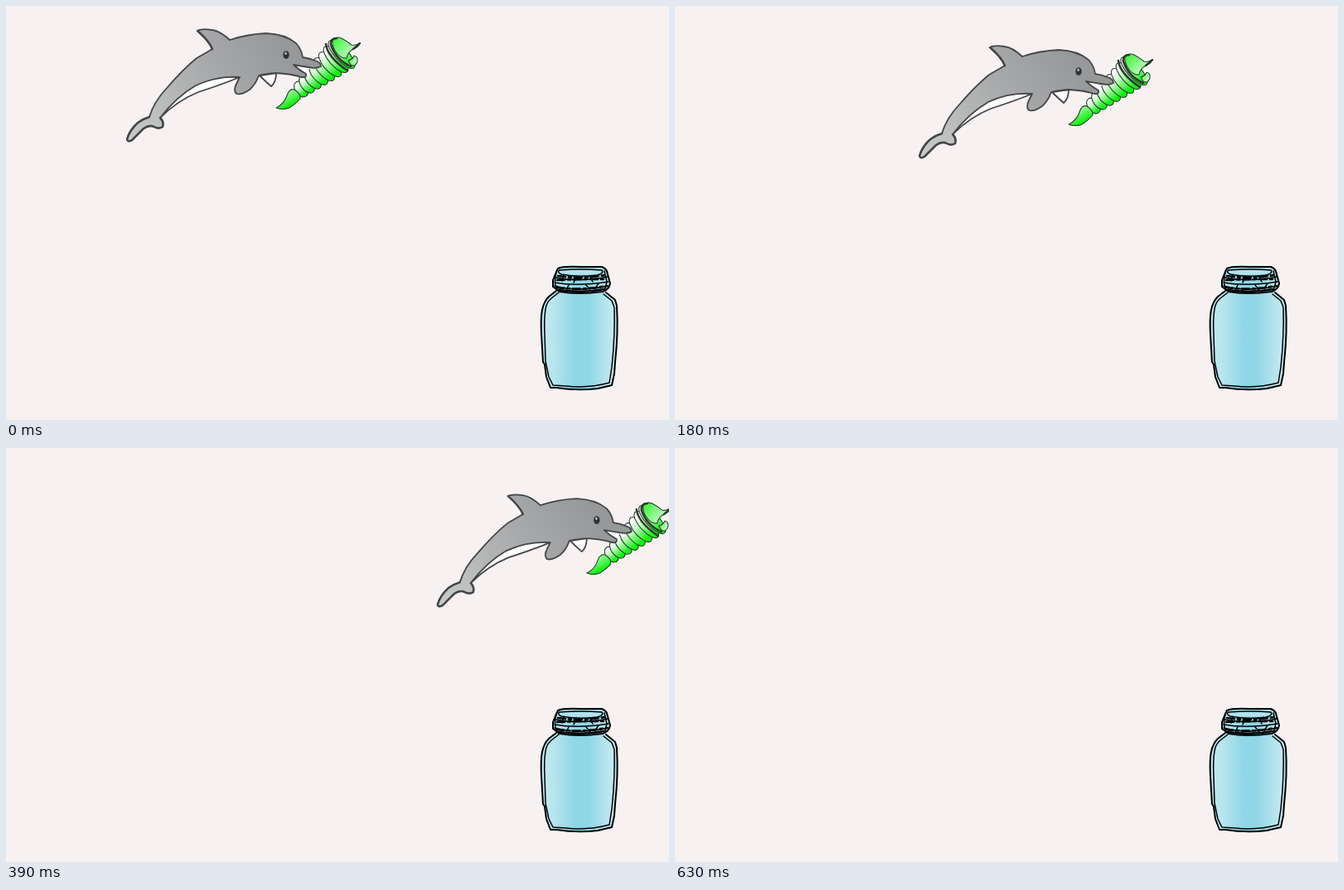
An HTML page that plays this animation: 800 by 500 pixels, repeating every 0.75 s.

```html
<!DOCTYPE html>
<html lang="en">
<head>
<meta charset="utf-8">
<title>Dolphin and jar</title>
<style>
html, body { margin: 0; width: 100%; height: 100%; overflow: hidden; background: #f7f1f1; }
svg { display: block; width: 100vw; height: 100vh; }
path, ellipse { stroke-linejoin: round; stroke-linecap: round; }
.ink { stroke: #444547; stroke-width: 1.8; }
.shell { stroke: #2c3a2c; stroke-width: 1.1; }
.halo { fill: #fff; stroke: #fff; stroke-width: 4; }
.line { fill: none; }
.bold { stroke-width: 2.5; }
.jar { fill: none; stroke: #000; stroke-width: 2; }
.thin { stroke-width: 1.5; }
.thick { stroke-width: 2.7; }
</style>
</head>
<body>
<svg viewBox="0 0 800 500">
  <defs>
    <linearGradient id="skin" gradientUnits="userSpaceOnUse" x1="150" y1="160" x2="335" y2="45">
      <stop offset="0" stop-color="#c6cac6"/>
      <stop offset=".2" stop-color="#bcbfbd"/>
      <stop offset=".55" stop-color="#a9aaac"/>
      <stop offset="1" stop-color="#97989a"/>
    </linearGradient>
    <linearGradient id="whorl" x1="0" y1="0" x2="1" y2="0">
      <stop offset=".12" stop-color="#fff"/>
      <stop offset=".42" stop-color="#b8fbb8"/>
      <stop offset=".85" stop-color="#10ee10"/>
    </linearGradient>
    <linearGradient id="tip" x1="0" y1="0" x2=".7" y2="1">
      <stop offset=".1" stop-color="#d8ffd8"/>
      <stop offset=".8" stop-color="#14ee14"/>
    </linearGradient>
    <linearGradient id="mouth" x1="0" y1="0" x2="1" y2=".6">
      <stop offset="0" stop-color="#2ff02f"/>
      <stop offset="1" stop-color="#d9ffd9"/>
    </linearGradient>
    <linearGradient id="glass" gradientUnits="userSpaceOnUse" x1="646" y1="0" x2="738" y2="0">
      <stop offset="0" stop-color="#c4e9f0"/>
      <stop offset=".14" stop-color="#bae5ee"/>
      <stop offset=".44" stop-color="#8fd6e6"/>
      <stop offset=".6" stop-color="#8fd6e6"/>
      <stop offset=".92" stop-color="#c2e8f0"/>
      <stop offset="1" stop-color="#c6e9f1"/>
    </linearGradient>
  </defs>

  <g id="glassJar">
    <path fill="url(#glass)" d="M666 316Q694 312 722 316Q727 324 728 337L724 345Q733 350 737 360L738 392L735 432L731 458Q713 463 688 463L657 461Q650 444 649 430Q644 398 647 367Q650 354 664 344L659 338L661 325Z"/>
    <path class="jar" d="M664 344L655 351Q649 357 647 367Q645 376 646 396L648 430L650 433L652 448L657 461L664 461Q690 465 714 462L731 458L734 444L735 430Q739 394 737 362L735 355L724 346"/>
    <path class="jar thin" d="M667 346L658 353Q652 358 651 366Q649 378 650 396L651 429L655 448L660 458L676 459Q702 462 728 455L731 436Q735 398 734 364L731 356L721 348"/>
    <ellipse cx="693" cy="321" rx="25" ry="3.6" fill="#b4e2ec"/>
    <path class="jar" d="M666 317Q672 314 693 315L719 315Q725 317 726 324L729 335Q728 342 720 345Q690 349 668 345L660 339L660 331L664 321Z"/>
    <path class="jar thin" d="M668 319Q694 317 719 319Q722 323 713 325Q691 328 670 324Q664 321 668 319M664 322Q661 332 664 341M722 320L725 333L723 341"/>
    <path class="jar thin" d="M663 328Q690 334 726 327M662 334Q689 339 727 333M662 338Q691 346 727 338"/>
    <path class="jar thick" stroke-dasharray="9 4 3 4" d="M666 326Q693 330 723 325M665 331L690 330L722 330M664 340Q694 344 725 338"/>
    <path class="jar thick" d="M666 343Q696 347 722 342"/>
    <path class="jar thin" d="M673 325L671 332M688 327L685 334M704 326L708 333M679 337L676 343M700 337L705 343M715 335L711 341"/>
  </g>

  <g id="swimmer">
    <path class="halo" d="M326 123Q336 118 339 108Q342 99 348 101L355 112Q350 118 342 123Q334 126 326 123M397 42Q404 37 417 47Q421 48 427 45Q425 50 419 53L413 61L420 60Q425 61 424 67Q422 74 416 71L400 60Z"/>
    <g id="whorls"></g>
    <path class="shell" fill="url(#tip)" d="M326 123Q336 118 339 108Q342 99 348 101Q356 106 355 112Q350 118 342 123Q334 126 326 123Z"/>
    <path class="shell" fill="url(#mouth)" d="M394 42Q398 36 405 39Q411 42 417 47Q421 48 427 45Q425 50 419 52Q412 56 411 63Q403 64 397 54Q393 47 394 42Z"/>
    <path class="shell" fill="url(#mouth)" d="M413 66Q419 64 420 60Q425 61 424 67Q422 74 416 71Z"/>
    <path class="shell line bold" d="M399 39Q391 39 392 47Q398 65 416 73M386 46Q388 62 412 78M419 52L427 45"/>

    <path class="ink" fill="#fff" d="M306 84Q312 90 320 97Q326 92 326 81Z"/>
    <path fill="#fff" d="M347 70L367 74L361 84Z"/>
    <path class="ink" fill="#fff" d="M282 86Q260 95 232 104Q207 114 186 135Q211 100 249 84Z"/>
    <path class="ink" fill="url(#skin)" d="M173 134Q178 116 195 98Q214 76 230 63L249 52Q245 42 231 30Q236 27 249 29Q258 30 270 41Q291 34 314 33Q337 34 350 45Q357 53 358 62Q366 63 373 66Q380 68 380 73Q374 76 365 74L347 71Q353 77 362 82Q363 87 357 86Q345 82 326 81Q313 82 305 84Q301 95 294 101Q284 108 278 106Q274 102 278 94L282 86Q255 84 229 96Q205 110 186 135Q191 140 189 146Q184 149 179 146Q173 143 166 148Q159 155 152 162Q147 165 146 161Q149 150 159 141Q166 136 173 134Z"/>
    <path class="ink line bold" d="M249 52Q245 42 231 30M186 135Q191 140 189 146Q184 149 179 146Q173 143 166 148Q159 155 152 162Q147 165 146 161Q149 150 159 141Q166 136 173 134"/>
    <ellipse cx="338" cy="59" rx="3.7" ry="4.8" fill="#303133"/>
    <ellipse cx="337.6" cy="57.2" rx="1.2" ry="1.7" fill="#c4c4c4"/>
  </g>
</svg>
<script>
const NS = 'http://www.w3.org/2000/svg';
const LOOP = 750, STEP = 30, COUNT = 8;
// step, dx, dy
const path = [[0, 0, 0], [3, 78, -16.5], [6, 149, 20], [8, 194, 50], [21, 664, -7]];
const swimmer = document.getElementById('swimmer');
const whorls = document.getElementById('whorls');
const mix = (a, b, k) => a + (b - a) * k;

function addWhorl(k, style) {
  const e = document.createElementNS(NS, 'ellipse');
  const attrs = {
    rx: mix(10.5, 22, k), ry: mix(7, 8, k), class: style, fill: 'url(#whorl)',
    transform: `translate(${mix(356, 405, k)} ${mix(100.5, 58.5, k)}) rotate(${mix(53, 47, k)})`
  };
  for (const name in attrs) e.setAttribute(name, attrs[name]);
  whorls.append(e);
}
for (const style of ['halo', 'shell']) {
  for (let i = 0; i < COUNT; i++) addWhorl(i / (COUNT - 1), style);
}

function draw(ms) {
  const n = Math.min(21, Math.floor((ms % LOOP) / STEP));
  const j = Math.max(1, path.findIndex(p => p[0] >= n));
  const a = path[j - 1], b = path[j];
  const k = (n - a[0]) / (b[0] - a[0]);
  swimmer.setAttribute('transform', `translate(${mix(a[1], b[1], k)} ${mix(a[2], b[2], k)})`);
}

let start;
function tick(now) {
  start ??= now;
  draw(now - start);
  requestAnimationFrame(tick);
}
draw(0);
requestAnimationFrame(tick);
</script>
</body>
</html>
```
